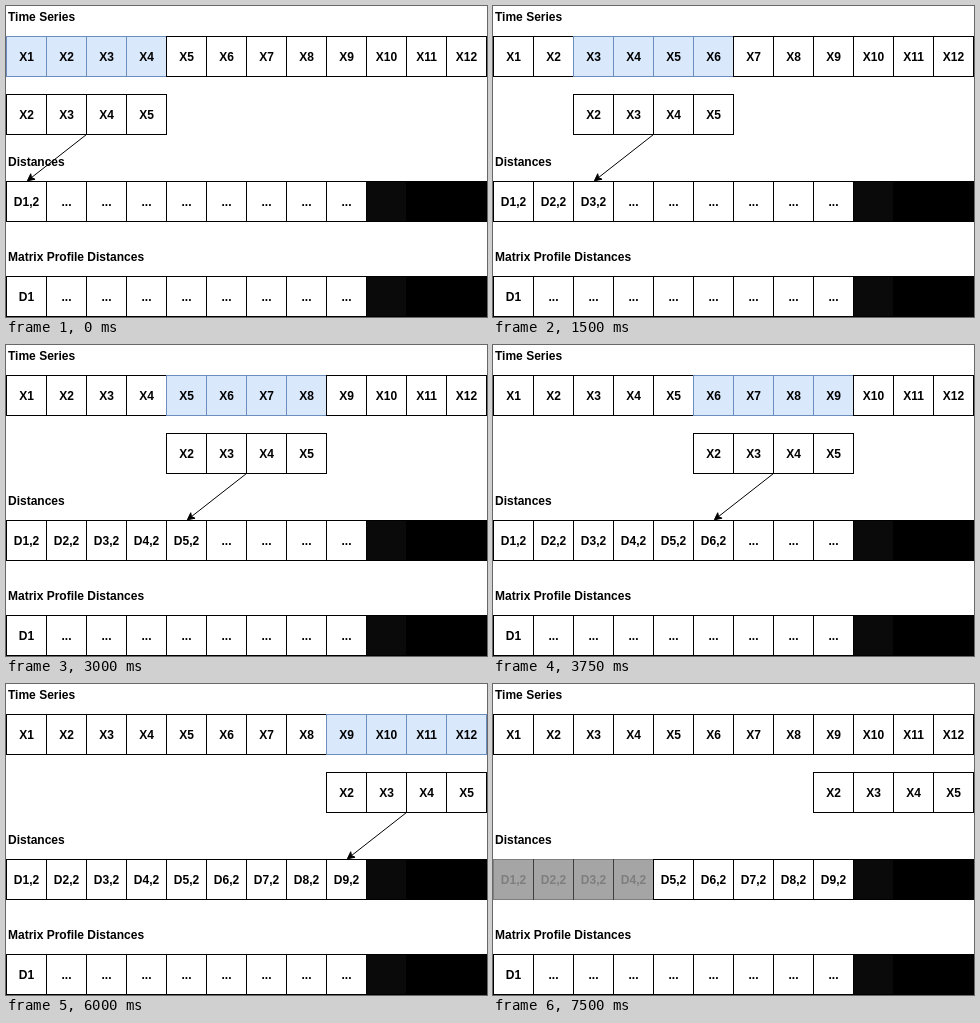
Animation, 481 px wide and 311 px high, one loop 8000 ms. Source, as an HTML page:

```html
<!DOCTYPE html>
<html lang="en">
<head>
<meta charset="utf-8">
<title>Sliding distances</title>
<style>
  html, body { margin: 0; width: 100%; height: 100%; overflow: hidden; background: #fff; }
  svg { display: block; }
  text { font: bold 12px "Liberation Sans", Arial, sans-serif; fill: #000; }
  rect { stroke: #000; }
  .cell text { text-anchor: middle; }
  #arrow path { stroke: #000; stroke-miterlimit: 10; }
</style>
</head>
<body>
<svg width="481" height="311" viewBox="0 0 481 311">
  <text x="2" y="15">Time Series</text>
  <text x="2" y="160">Distances</text>
  <text x="2" y="255">Matrix Profile Distances</text>
  <g transform="translate(.5 .5)">
    <g id="series"></g>
    <g id="query"></g>
    <g id="distances"></g>
    <g id="profile"></g>
    <g id="arrow"></g>
  </g>
</svg>
<script>
const SIZE = 40, STEP = 750, LOOP = 8000, WINDOWS = 9;
const byId = id => document.getElementById(id);

function cell(col, y, label, { fill = '#fff', stroke = '#000', opacity = 1 } = {}) {
  return `<g class="cell" opacity="${opacity}">
    <rect x="${col * SIZE}" y="${y}" width="${SIZE}" height="${SIZE}" style="fill:${fill};stroke:${stroke}"/>
    <text x="${col * SIZE + 20}" y="${y + 24.5}">${label}</text></g>`;
}

function row(id, count, y, label, style = () => ({})) {
  byId(id).innerHTML = Array.from({ length: count }, (_, i) => cell(i, y, label(i), style(i))).join('');
}

// Cells past the last window are blacked out.
const blackout = i => i < WINDOWS ? {} : { fill: i === WINDOWS ? '#0a0a0a' : '#000' };

function drawArrow() {
  const from = [80, 128], to = [20, 175];
  const len = Math.hypot(to[0] - from[0], to[1] - from[1]);
  const ux = (to[0] - from[0]) / len, uy = (to[1] - from[1]) / len;
  const at = (back, side = 0) =>
    `${to[0] - ux * (back + 1.118) - uy * side} ${to[1] - uy * (back + 1.118) + ux * side}`;
  byId('arrow').innerHTML =
    `<path d="M${from} L${at(5.25)}" fill="none"/>
     <path d="M${at(0)} L${at(7, 3.5)} L${at(5.25)} L${at(7, -3.5)} Z"/>`;
}

function render(step) {
  const pos = Math.min(step, WINDOWS - 1);
  const sliding = step < WINDOWS;
  const shift = `translate(${pos * SIZE} 0)`;

  row('series', 12, 30, i => `X${i + 1}`, i =>
    sliding && i >= pos && i < pos + 4 ? { fill: '#dae8fc', stroke: '#6c8ebf' } : {});

  row('distances', 12, 175,
    i => i <= pos ? `D${i + 1},2` : i < WINDOWS ? '...' : '',
    i => !sliding && i < 4 ? { fill: '#4d4d4d', opacity: step > WINDOWS ? .5 : 1 } : blackout(i));

  byId('query').setAttribute('transform', shift);
  byId('arrow').setAttribute('transform', shift);
  byId('arrow').style.display = sliding ? '' : 'none';
}

row('query', 4, 88, i => `X${i + 2}`);
row('profile', 12, 270, i => i === 0 ? 'D1' : i < WINDOWS ? '...' : '', blackout);
drawArrow();

let shown = -1;
const start = performance.now();
function tick() {
  const step = Math.floor((performance.now() - start) % LOOP / STEP);
  if (step !== shown) render(shown = step);
  requestAnimationFrame(tick);
}
tick();
</script>
</body>
</html>
```
